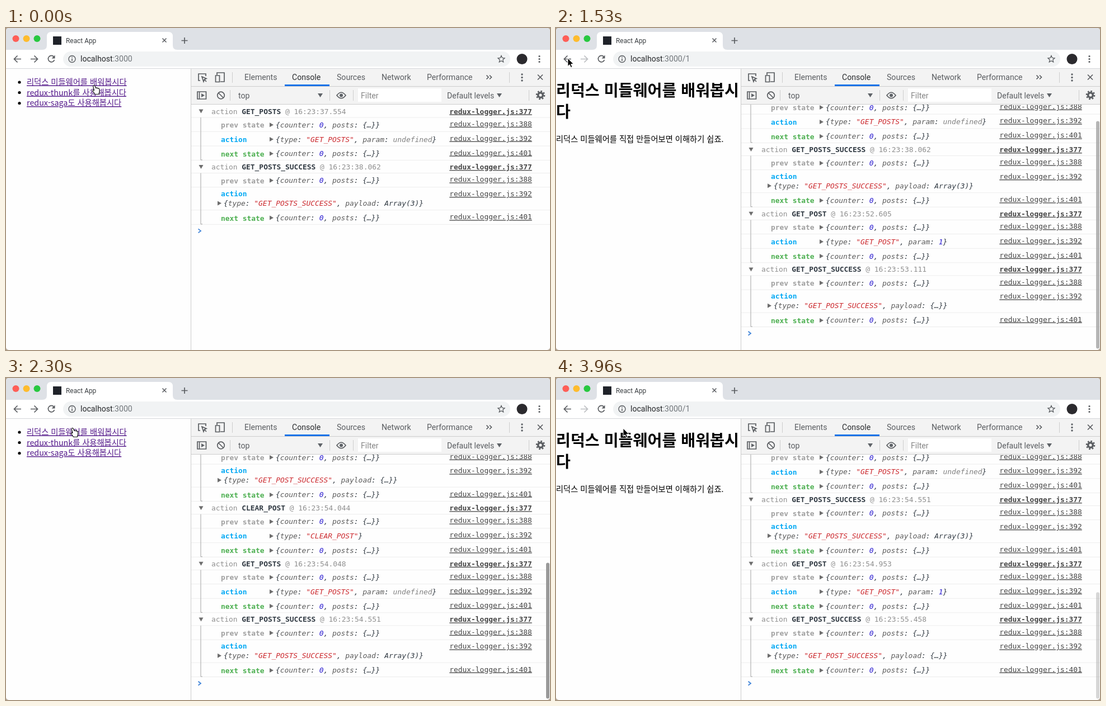
Recreate the animation shown at these times as an HTML page. Size 972 by 576 pixels, loop 4.13 s.

```html
<!DOCTYPE html>
<html lang="ko">
<head>
<meta charset="utf-8">
<title>React App</title>
<style>
html, body { margin: 0; width: 100%; height: 100%; overflow: hidden; background: #b3a596; }
svg { display: block; border-radius: 5px; font-family: Roboto, Arial, sans-serif; }
text { white-space: pre; }
.mono { font: 12.9px "DejaVu Sans Mono", Menlo, monospace; }
.b { font-weight: 700; }
.i { font-style: italic; }
.u { text-decoration: underline; }
.page { font: 14.27px "Noto Sans CJK KR", "Noto Sans CJK", "Noto Sans CJK JP", sans-serif; }
.page .h { font-size: 28.2px; font-weight: 700; }
.line { fill: none; stroke: #5a5d61; stroke-width: 1.7; }
</style>
</head>
<body>
<svg width="972" height="576" viewBox="0 0 972 576">
  <rect width="972" height="576" fill="#fefefe"/>

  <g id="log" class="mono"></g>
  <rect id="thumb" x="965" width="6" rx="3" fill="#999"/>

  <!-- developer tools -->
  <path fill="#f3f3f3" d="M331 73H972V137H331Z"/>
  <path stroke="#cdcdcd" d="M330.5 73V576M331 104.5H972M331 136.5H972M404.5 79V98M899.5 79V98M400.5 111V130M578.5 111V130M620.5 111V130M934.5 111V130"/>
  <path fill="#1a73e8" d="M498 101H578V104H498Z"/>
  <path fill="#fff" d="M629 108H778V132H629Z"/>
  <g id="tabs" font-size="14.1" fill="#5f6368"></g>
  <g class="line" stroke-width="1.5">
    <path d="M347 94H344V82H357V86M350 87L358 90.500 354.500 92 353 96ZM354.500 92L358 96"/>
    <path d="M377 84V80H390V96H383M374.500 85H381.500V96.500H374.500Z"/>
    <path d="M858.500 84.500L862 88 858.500 91.500M864 84.500L867.500 88 864 91.500"/>
    <path d="M950 83.500L959 92.500M959 83.500L950 92.500"/>
    <path d="M342 114H357.500V127H342ZM345.500 114V127"/>
    <circle cx="384" cy="120.500" r="6.300"/><path d="M379.500 116L388.500 125"/>
    <path d="M591 120.500Q599 110 607 120.500Q599 131 591 120.500Z"/>
    <circle cx="955" cy="120" r="4.300" stroke-width="3.500"/>
    <circle cx="955" cy="120" r="7" stroke-width="2.600" stroke-dasharray="2.750"/>
  </g>
  <g fill="#5f6368">
    <path d="M349 117L355 120.500 349 124ZM557 117H566L561.500 124ZM877 117H886L881.500 124Z"/>
    <circle cx="599" cy="120.500" r="3"/>
    <circle cx="922" cy="83" r="1.700"/><circle cx="922" cy="88.500" r="1.700"/><circle cx="922" cy="94" r="1.700"/>
  </g>

  <!-- browser frame -->
  <path fill="#dee1e6" d="M0 0H972V39H0Z"/>
  <path fill="#fff" d="M65 39Q73 39 73 31V15Q73 7 81 7H290Q298 7 298 15V31Q298 39 306 39H972V72H0V39Z"/>
  <path stroke="#d5d7da" d="M0 72.500H972"/>
  <circle cx="17.500" cy="19" r="6" fill="#ff5f57"/>
  <circle cx="36.500" cy="19" r="6" fill="#febc2e"/>
  <circle cx="55.500" cy="19" r="6" fill="#28c840"/>
  <rect x="84" y="15" width="15" height="15" fill="#20232a"/>
  <text x="107" y="26.500" font-size="11.900" fill="#3c4043">React App</text>
  <rect x="102" y="42" width="799" height="27" rx="13.500" fill="#f1f3f4"/>
  <circle id="press" cx="20.500" cy="55.500" r="13" fill="#dfe0e2"/>
  <g class="line">
    <path stroke-width="1.500" d="M279.500 18.500L286.500 25.500M286.500 18.500L279.500 25.500"/>
    <path d="M313.500 22.500H324.500M319 17V28"/>
    <path d="M27 55.500H15M20.500 49.500L14.500 55.500 20.500 61.500"/>
    <path id="forward" d="M44 55.500H56M50.500 49.500L56.500 55.500 50.500 61.500"/>
    <path d="M85.500 51.500A5.700 5.700 0 1 0 86.500 57"/>
    <circle cx="118" cy="55.500" r="6" stroke-width="1.400"/>
    <path stroke-width="1.500" d="M118 54.500V59M118 51.500V53"/>
    <path stroke-width="1.300" d="M885 49.500L886.700 53.500 891 53.900 887.800 56.800 888.700 61 885 58.800 881.300 61 882.200 56.800 879 53.900 883.300 53.500Z"/>
  </g>
  <path fill="#5a5d61" d="M87.500 48.500V54.500H81.500Z"/>
  <text x="133" y="60.300" font-size="14.100" fill="#27292c">localhost<tspan fill="#70757a">:3000<tspan id="route"></tspan></tspan></text>
  <circle cx="922" cy="55.500" r="9.500" fill="#2b2a2e"/>
  <g fill="#5a5d61"><circle cx="953" cy="50.500" r="1.600"/><circle cx="953" cy="55.500" r="1.600"/><circle cx="953" cy="60.500" r="1.600"/></g>

  <!-- web page -->
  <g class="page">
    <g id="list">
      <circle cx="24" cy="97" r="2.600"/><circle cx="24" cy="115.500" r="2.600"/><circle cx="24" cy="134.500" r="2.600"/>
      <g fill="#551a8b" class="u">
        <text x="37" y="101.500">리덕스 미들웨어를 배워봅시다</text>
        <text x="37" y="120.500">redux-thunk를 사용해봅시다</text>
        <text x="37" y="139">redux-saga도 사용해봅시다</text>
      </g>
    </g>
    <text id="loading" y="87">로딩중...</text>
    <g id="post">
      <text class="h" y="121.500">리덕스 미들웨어를 배워봅시</text>
      <text class="h" y="160">다</text>
      <text y="204">리덕스 미들웨어를 직접 만들어보면 이해하기 쉽죠.</text>
    </g>
  </g>
  <g id="bubble">
    <path fill="#f5f5f5" stroke="#bdbdbd" d="M-1 557.500H90.500Q94.500 557.500 94.500 561.500V577H-1Z"/>
    <text x="3" y="570.500" font-size="11.650" fill="#5f6368">localhost:3000/1</text>
  </g>

  <g id="cursor" stroke-linejoin="round">
    <path id="arrow" stroke="#fff" d="M0 0V14.500L3.300 11.500 5.600 16.700 8 15.600 5.800 10.600H10.300Z"/>
    <path id="hand" fill="#fff" stroke="#111" stroke-width="1.200" d="M-2.500 .5Q-1 -1.500 .3 .5L2 4.500Q3.500 3 4.500 4.700Q6 3.800 6.700 5.400Q8.500 5 8.500 7V11L7.300 15.500H.5L-3.500 9.500Q-3.800 7.500 -1 8.500L-2.800 2Z"/>
    <path id="beam" fill="none" stroke="#111" stroke-width="1.300" d="M-3.500 -7Q0 -7 0 -5V5Q0 7 -3.500 7M3.500 -7Q0 -7 0 -5M0 5Q0 7 3.500 7M-2 2.500H2"/>
  </g>
</svg>
<script>
const LOOP = 4130;
const el = id => document.getElementById(id);
const show = (id, on) => el(id).style.display = on ? '' : 'none';
const text = (x, y, fill, body, cls = '') => `<text x="${x}" y="${y}" fill="${fill}" class="${cls}">${body}</text>`;
const span = (fill, body) => `<tspan fill="${fill}">${body}</tspan>`;

el('tabs').innerHTML = [
  ['Elements', 426, 93], ['Console', 511, 93], ['Sources', 591, 93], ['Network', 671, 93],
  ['Performance', 752, 93], ['top', 415, 125.5], ['Filter', 634, 125.5], ['Default levels', 788, 125.5]
].map(([s, x, y]) => text(x, y, s == 'Console' ? '#2b2d30' : s == 'Filter' ? '#858585' : '#5a5d61', s)).join('');

// name, clock, rest of the action, time shown, time completed
const groups = [
  ['GET_POSTS', '37.554', ', param: undefined', 0],
  ['GET_POSTS_SUCCESS', '38.062', ', payload: Array(3)', 0],
  ['GET_POST', '52.605', ', param: 1', 300],
  ['GET_POST_SUCCESS', '53.111', ', payload: {…}', 800],
  ['CLEAR_POST', '54.044', '', 1800],
  ['GET_POSTS', '54.048', ', param: undefined', 1830, 1860],
  ['GET_POSTS_SUCCESS', '54.551', ', payload: Array(3)', 2260],
  ['GET_POST', '54.953', ', param: 1', 2660],
  ['GET_POST_SUCCESS', '55.458', ', payload: {…}', 3160]
];

const colour = s => s[0] == '"' ? '#cc2a2f' : s == 'undefined' ? '#808080' : /\d/.test(s) ? '#2a1bcf' : '#5a5a5a';
const preview = (x, y, s) =>
  `<path fill="#6e6e6e" d="M${x - 11} ${y - 8.5}l7 4 -7 4z"/>` +
  text(x, y, '#303942', s.replace(/"\w+"|(?<=: )\d|undefined|\w+(?=:)/g, m => span(colour(m), m)), 'i');
const link = (y, line, cls = 'u') => text(792.3, y, '#454545', 'redux-logger.js:' + line, cls);
const rule = y => `<path stroke="#ededed" d="M331 ${y}H972"/>`;
const bracket = d => `<path fill="none" stroke="#a3a3a3" d="M348 ${d}"/>`;
const state = '{counter: 0, posts: {…}}';

const parts = [];
const add = (at, end, html) => parts.push({ at, end, html });
let y = 153.5;
for (const [name, clock, rest, at, late = at] of groups) {
  const long = name.endsWith('SUCCESS'), d = long ? 15.2 : 0;
  const action = `{type: "${name}"${rest}}`;
  add(at, y + 47.5,
    `<path fill="#6e6e6e" d="M344.500 ${y - 8}h8l-4 7z"/>` +
    text(367, y, '#8f8f8f', `action <tspan class="b" fill="#303942">${name}</tspan> @ 16:23:${clock}`) +
    link(y, 377, 'u b') + rule(y + 6.5) +
    text(384, y + 24.5, '#9e9e9e', 'prev state', 'b') + preview(482, y + 24.2, state) +
    link(y + 22.3, 388) + rule(y + 31.7) + bracket(`${y + 6.5}V${y + 31.7}`));
  add(late, y + 99.1 + d,
    text(384, y + (long ? 47.7 : 50.3), '#03a9f4', 'action', 'b') +
    (long ? preview(389, y + 64.8, action) : preview(482, y + 50, action)) +
    link(y + 48, 392) + rule(y + 57.5 + d) +
    text(384, y + 76.3 + d, '#4caf50', 'next state', 'b') + preview(482, y + 75.8 + d, state) +
    link(y + 74 + d, 401) + rule(y + 83 + d) + bracket(`${y + 31.7}V${y + 82.5 + d}h3`));
  y += 99.6 + d;
}
el('log').innerHTML = parts.map(p => `<g>${p.html}</g>`).join('') +
  '<path id="prompt" fill="none" stroke="#4285d8" stroke-width="1.800" d="M343.500 -8L348 -4.500 343.500 -1"/>';
parts.forEach((p, i) => p.node = el('log').children[i]);

const ramp = (t, a, b) => Math.min(1, Math.max(0, (t - a) / (b - a)));
const path = [[0, 158.5, 103], [30, 158.5, 103], [180, 156, 97], [1130, 156, 97],
  [1450, 21, 54], [2030, 21, 54], [2280, 120, 90], [LOOP, 120, 90]];

function cursorAt(t) {
  const i = path.findIndex(p => p[0] > t), [a, x, y] = path[i - 1], [b, x2, y2] = path[i];
  const k = ramp(t, a, b), e = k * k * (3 - 2 * k);
  return [x + (x2 - x) * e, y + (y2 - y) * e];
}

function draw(t) {
  let end = 0;
  for (const p of parts) {
    const on = t >= p.at;
    p.node.style.display = on ? '' : 'none';
    if (on) end = p.end;
  }
  const scroll = Math.max(0, end - 550.7), top = 137.5 + scroll / (scroll + 440) * 439;
  el('log').setAttribute('transform', `translate(0 ${-scroll})`);
  el('prompt').setAttribute('transform', `translate(0 ${end})`);
  el('thumb').setAttribute('y', top);
  el('thumb').setAttribute('height', 573.5 - top);
  const fade = t < 1800 ? ramp(t, 1440, 1630) : ramp(t, 3770, 3960);
  el('thumb').style.opacity = scroll ? 1 - .6 * fade : 0;

  const page = t < 260 ? 'list' : t < 760 ? 'loading' : t < 1760 ? 'post' :
    t < 2600 ? 'list' : t < 3110 ? 'loading' : 'post';
  for (const id of ['list', 'loading', 'post']) show(id, id == page);
  el('route').textContent = page == 'list' ? '' : '/1';
  el('forward').style.stroke = page == 'list' ? '' : '#bcbec1';
  show('press', t >= 1660 && t < 2060);
  el('bubble').style.opacity = t < 1500 ? ramp(t, 270, 400) - ramp(t, 690, 820) : ramp(t, 2370, 2500) - ramp(t, 3040, 3170);

  const kind = t < 270 || t >= 2210 && t < 2610 ? 'hand' : t >= 790 && t < 1180 ? 'beam' : 'arrow';
  for (const id of ['arrow', 'hand', 'beam']) show(id, id == kind);
  el('cursor').setAttribute('transform', `translate(${cursorAt(t)})`);
}

const start = performance.now();
(function tick() {
  draw((performance.now() - start) % LOOP);
  requestAnimationFrame(tick);
})();
</script>
</body>
</html>
```
